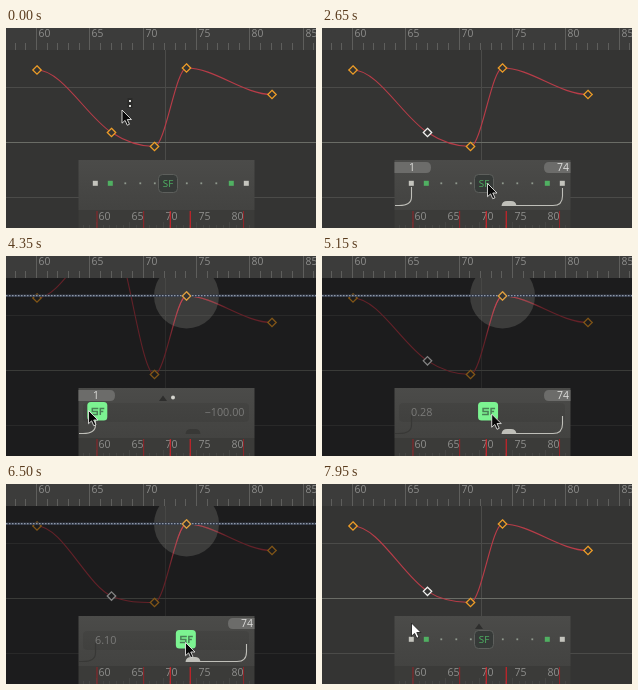
Animation, 310 px wide and 200 px high, one loop 8 s. Source, as an HTML page:

```html
<!DOCTYPE html>
<html lang="en">
<head>
<meta charset="utf-8">
<title>Curve editor</title>
<style>
html, body { margin: 0; width: 100%; height: 100%; overflow: hidden; background: #343433; }
svg { display: block; width: 100vw; height: 100vh; font-family: "Open Sans", "Noto Sans", sans-serif; }
</style>
</head>
<body>
<svg id="stage" viewBox="0 0 310 200">
  <defs>
    <clipPath id="graphClip"><rect y="22" width="310" height="178"/></clipPath>
    <radialGradient id="glow" gradientUnits="userSpaceOnUse" cx="178" cy="44" r="44">
      <stop offset=".1" stop-color="#c54452"/>
      <stop offset="1" stop-color="#c54452" stop-opacity="0"/>
    </radialGradient>
    <linearGradient id="panelFill" x2="0" y2="1">
      <stop offset="0" stop-color="#4b4b49"/>
      <stop offset="1" stop-color="#434341"/>
    </linearGradient>
  </defs>

  <rect width="310" height="200" fill="#343433"/>
  <g clip-path="url(#graphClip)">
    <path d="M0 59.500H310M0 169.500H310M159.500 22V200" stroke="#4b4b49"/>
    <path d="M0 114.500H310" stroke="#6a6c66"/>
    <path id="curve" fill="none" stroke="#b83c48" stroke-width="1.1"/>
    <g id="keys"></g>
    <g id="focus">
      <rect y="22" width="310" height="178" fill="#000004" opacity=".46"/>
      <circle cx="180.500" cy="40" r="32.500" fill="#fffff0" opacity=".14"/>
      <path id="hotCurve" fill="none" stroke="url(#glow)" stroke-width="1.1"/>
      <path d="M0 39.800H310" stroke="#343b49" stroke-width="2.4"/>
      <path d="M0 39.600H310" stroke="#8f99a9" stroke-width="1.4" stroke-dasharray="1.5 1.5"/>
      <g id="hotKey"></g>
    </g>
  </g>
  <rect width="310" height="22" fill="#3c3c3b"/>
  <g id="topRuler"></g>

  <rect x="72.500" y="132" width="176" height="50" fill="url(#panelFill)"/>
  <rect id="field" x="77" y="147" width="166" height="19" rx="4" fill="#000" opacity=".07"/>
  <rect x="72.500" y="182" width="176" height="18" fill="#3b3b39"/>
  <g id="panelRuler"></g>

  <path id="leftBracket" d="M89.500 159V169Q89.500 177.500 77 177.500H73" fill="none" stroke-width="1.1"/>
  <path id="rightBracket" d="M240.500 160V168Q240.500 177.500 231 177.500H190" fill="none" stroke-width="1.1"/>
  <path id="bump" d="M179.500 178Q180 173 185 173H189Q194 173 194.500 178Z"/>
  <g id="leftTab">
    <path d="M72.500 134H104Q109 134 109 139.500Q109 145 104 145H72.500Z" fill="#6c6c6a"/>
    <text x="87" y="143" font-size="10.500" fill="#dededc">1</text>
  </g>
  <g id="rightTab">
    <path d="M248.500 134H227Q222 134 222 139.500Q222 145 227 145H248.500Z" fill="#6c6c6a"/>
    <text x="247" y="143" font-size="10.500" fill="#dededc" text-anchor="end">74</text>
  </g>
  <path id="notch" d="M153 145L157 139.500L161 145Z" fill="#2e2e2d"/>
  <circle id="spot" cx="167" cy="141.500" r="2" fill="#d4d4ce"/>
  <g id="stops"></g>
  <g id="button">
    <rect id="buttonBox" x="152.500" y="146.500" width="19" height="18" rx="4" fill="#363a38" stroke="#5d5f5c"/>
    <text id="buttonText" x="162" y="158.600" font-size="9.800" text-anchor="middle">SF</text>
  </g>
  <text id="value" y="160" font-size="10.800" fill="#7b7b79"></text>
  <g id="handle">
    <rect x="-10" y="146" width="20" height="18.500" rx="3.500" fill="#7cf391"/>
    <path d="M1 152.500H-5V155.500H0V158.500H-6M3 159V152.500H7M3 155.500H6" fill="none" stroke="#4a8056" stroke-width="1.500"/>
  </g>
  <g id="cursor">
    <path id="arrow" d="M0 0V15L3.500 11.800L6 17.300L8.500 16.200L6 10.800H10.800Z" transform="scale(.88)"/>
    <g id="busy">
      <path d="M5.500 -12h5v10h-5z" fill="#2a2a29"/>
      <path d="M7 -10h2v2h-2zM7 -5h2v2h-2z" fill="#dcdcd8"/>
    </g>
  </g>
</svg>
<script>
const $ = id => document.getElementById(id);
const LOOP = 8000, STEP = 50, CENTER = 162.3, REACH = 71;
const ORANGE = '#ee9d28', BRIGHT = '#bfbfb9', DARK = '#383836';

function add(parent, tag, attrs, text = '') {
  const el = document.createElementNS('http://www.w3.org/2000/svg', tag);
  for (const name in attrs) el.setAttribute(name, attrs[name]);
  el.textContent = text;
  return parent.appendChild(el);
}

function drawRuler(group, { origin, unit, top, tick, bottom, baseline, first, last, max, size, ink }) {
  for (let n = first; n <= last; n++) {
    const x = Math.round(origin + (n - 60) * unit) - .5;
    if (x < 0 || x > max) continue;
    const major = n % 5 === 0;
    add(group, 'path', { d: `M${x} ${major ? top : tick}V${bottom}`, stroke: ink });
    if (major) add(group, 'text', { x: x + 2, y: baseline, 'font-size': size, fill: '#8e8e8c' }, n);
  }
}

drawRuler($('topRuler'), { origin: 31, unit: 10.66, top: 0, tick: 15, bottom: 22, baseline: 9,
  first: 57, last: 86, max: 310, size: 10.3, ink: '#5e5e5c' });
drawRuler($('panelRuler'), { origin: 91, unit: 6.66, top: 194, tick: 197, bottom: 200, baseline: 191.5,
  first: 58, last: 83, max: 248, size: 10.5, ink: '#454543' });
[[60, '#8d2529'], [67, '#8d2529'], [71, '#d92027'], [74, '#d92027'], [82, '#8d2529']].forEach(([frame, stroke]) =>
  add($('panelRuler'), 'path', { d: `M${91 + (frame - 60) * 6.66} 183V200`, stroke, 'stroke-width': 1.1 }));

for (const side of [-1, 1]) {
  for (const [offset, size, fill] of [[75.5, 5, '#c4c4bd'], [60.5, 5, '#50b062'],
    [45.5, 1.8, '#8f988d'], [30.5, 1.8, '#8f988d'], [16, 1.8, '#8f988d']]) {
    add($('stops'), 'rect', { x: 164.8 + side * offset - size / 2, y: 155.3 - size / 2, width: size, height: size, fill });
  }
}

const diamond = (parent, x, y, stroke) =>
  add(parent, 'path', { d: 'M0 -4.2L4.2 0L0 4.2L-4.2 0Z', fill: '#343433', stroke,
    'stroke-width': 1.3, transform: `translate(${x} ${y})` });

const keys = [[31, 42], [105.5, 104.5], [148.5, 118.5], [180.5, 40], [266, 66.5]];
const diamonds = keys.map(([x, y]) => diamond($('keys'), x, y, ORANGE));
diamond($('hotKey'), ...keys[3], '#e0a040');

// Automatic tangents: flat at ends and extremes, limited elsewhere.
function slope(i) {
  if (i === 0 || i === keys.length - 1) return 0;
  const [a, b, c] = keys.slice(i - 1, i + 2);
  const before = b[1] - a[1], after = c[1] - b[1];
  if (before * after <= 0) return 0;
  const limit = Math.min(Math.abs(before * 3 / (b[0] - a[0])), Math.abs(after * 3 / (c[0] - b[0])));
  return Math.sign(after) * Math.min(Math.abs((c[1] - a[1]) / (c[0] - a[0])), limit);
}

function curvePath() {
  let d = `M${keys[0]}`;
  for (let i = 1; i < keys.length; i++) {
    const [x0, y0] = keys[i - 1], [x1, y1] = keys[i], h = (x1 - x0) / 3;
    d += `C${x0 + h} ${y0 + h * slope(i - 1)} ${x1 - h} ${y1 - h * slope(i)} ${x1} ${y1}`;
  }
  return d;
}

// Each point is [time, ...values]; values ease between points.
function track(points, t) {
  if (t <= points[0][0]) return points[0].slice(1);
  for (let i = 1; i < points.length; i++) {
    const a = points[i - 1], b = points[i];
    if (t <= b[0]) {
      const u = (t - a[0]) / (b[0] - a[0]), s = u * u * (3 - 2 * u);
      return a.slice(1).map((v, k) => v + (b[k + 1] - v) * s);
    }
  }
  return points[points.length - 1].slice(1);
}

const cursorPath = [
  [0, 116, 82], [250, 94, 113], [700, 94, 136], [900, 88, 154], [1100, 88, 154], [1450, 239.5, 156],
  [1550, 239.5, 156], [1700, 165.5, 155.5], [3500, 165.5, 155.5], [4100, 82.5, 154.5], [4400, 82.5, 154.5],
  [5000, 164, 158], [5700, 212.5, 158.5], [5850, 214, 158.5], [5950, 214, 158.5], [6500, 179.5, 158.5],
  [6650, 173, 158.5], [6900, 173, 158.5], [7600, 122, 150], [7700, 122, 150], [7900, 89.5, 139]
];
const handlePath = [
  [3500, 0], [4150, -REACH], [4400, -REACH], [5025, 0], [5700, 41.76], [5850, 43.5],
  [5950, 43.5], [6500, 17.54], [6650, 10.8]
];
const focusPath = [[2800, 0], [3050, 1], [6850, 1], [7050, 0]];

const show = (id, on) => $(id).setAttribute('visibility', on ? 'visible' : 'hidden');
const set = (id, name, value) => $(id).setAttribute(name, value);

function render(t) {
  const [offset] = track(handlePath, t);
  const percent = Math.sign(offset) * (offset / REACH) ** 2 * 100;
  const dragging = t >= 3550 && t < 6850;
  const negative = dragging && offset < 0, positive = dragging && offset >= 0;
  const resting = t >= 7700;
  const pressed = t >= 2850 && t < 3550;

  keys[1][1] = 104.5 + percent * 1.24;
  diamonds[1].setAttribute('transform', `translate(${keys[1]})`);
  diamonds[1].setAttribute('stroke', t >= 150 ? '#f2f2f0' : ORANGE);
  set('curve', 'd', curvePath());
  set('hotCurve', 'd', curvePath());
  set('focus', 'opacity', track(focusPath, t)[0]);

  show('leftTab', t >= 900 && !positive && !resting);
  show('rightTab', t >= 2650 && !negative && !resting);
  show('leftBracket', t >= 900 && !resting);
  show('rightBracket', t >= 1650 && !negative && !resting);
  show('bump', t >= 1650 && !resting);
  set('leftBracket', 'stroke', positive ? DARK : BRIGHT);
  set('rightBracket', 'stroke', BRIGHT);
  set('bump', 'fill', negative ? DARK : BRIGHT);
  show('notch', t >= 2850 && !positive);
  show('spot', negative);

  show('field', dragging);
  show('stops', !dragging);
  show('button', !dragging);
  set('buttonBox', 'opacity', pressed ? .5 : 1);
  set('buttonText', 'fill', pressed ? '#62e27a' : '#4fb564');
  show('handle', dragging);
  set('handle', 'transform', `translate(${CENTER + offset} 0)`);
  show('value', dragging);
  set('value', 'x', negative ? 238.5 : 89);
  set('value', 'text-anchor', negative ? 'end' : 'start');
  $('value').textContent = percent.toFixed(2).replace('-', '\u2212');

  const [x, y] = track(cursorPath, t);
  const light = t >= 750 && t < 1600 || t >= 6850;
  show('cursor', t < 250 || t >= 750);
  $('busy').style.display = t < 50 ? '' : 'none';
  set('cursor', 'transform', `translate(${x} ${y})`);
  set('arrow', 'fill', light ? '#fff' : '#080808');
  set('arrow', 'stroke', light ? '#222' : '#e6e6e4');
}

const start = performance.now();
function tick() {
  const t = (performance.now() - start) % LOOP;
  render(Math.floor(t / STEP) * STEP);
  requestAnimationFrame(tick);
}
tick();
</script>
</body>
</html>
```
